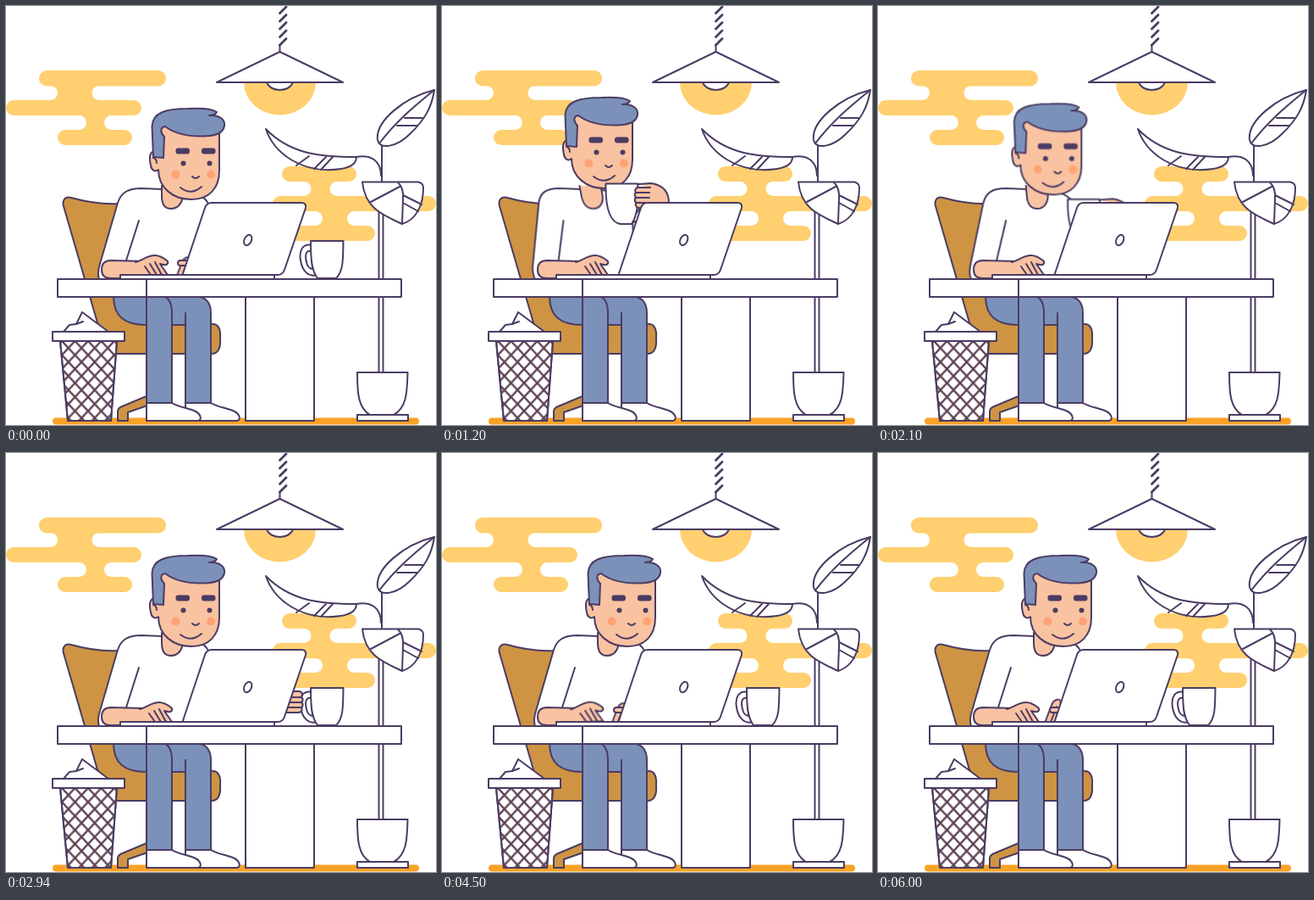
Animation of 508 by 494 pixels, one loop 6.06 s. Source, as an HTML page without scripts:

```html
<!DOCTYPE html>
<html lang="en">
<head>
<meta charset="utf-8">
<title>Coffee break at the desk</title>
<style>
  html, body { margin: 0; width: 100%; height: 100%; overflow: hidden; background: #fff; }
  svg { display: block; width: 100%; height: 100%; }
  :root { --loop: 6060ms; --beat: 178.235ms; }

  .ink { stroke: #4b3c63; stroke-width: 2; stroke-linecap: round; stroke-linejoin: round; fill: none; }
  .white { fill: #fff; }
  .skin { fill: #f9c2a1; }
  .blue { fill: #7b91ba; }
  .wood { fill: #ce9443; }
  .sun { fill: #ffcf70; }
  .dark { fill: #4b3c63; stroke: none; }
  .blush { fill: #ffa374; stroke: none; }

  .torso, .head, .sip, .mug, .grip, .keys, .still, .busy, .eyes {
    animation: var(--loop) ease-in-out infinite;
  }
  .torso { animation-name: torso; transform-origin: 0 322px; }
  .head { animation-name: head; transform-origin: 200px 225px; }
  .sip { animation-name: sip; transform-origin: 238px 232px; }
  .mug { animation-name: mug; }
  .grip { animation-name: grip; }
  .keys { animation-name: keys; }
  .still { animation-name: still; }
  .busy { animation-name: busy; animation-timing-function: step-end; }
  .eyes { animation-name: blink; transform-origin: 225px 185px; }
  .tapL, .tapR { animation: tapL var(--beat) -70ms ease-in-out infinite alternate; }
  .tapL { transform-origin: 160px 306px; }
  .tapR { animation-name: tapR; }

  @keyframes torso {
    0%, 11.2% { transform: skewX(0deg); }
    19.8%, 29.7% { transform: skewX(11.1deg); }
    38.9%, 100% { transform: skewX(0deg); }
  }
  @keyframes head {
    0%, 11.2% { transform: translate(0, 0) rotate(0deg); }
    19.8% { transform: translate(-27px, -13px) rotate(0deg); }
    23.5%, 27% { transform: translate(-28px, -14px) rotate(-4deg); }
    29.7% { transform: translate(-27px, -13px) rotate(0deg); }
    38.9%, 100% { transform: translate(0, 0) rotate(0deg); }
  }
  @keyframes sip {
    0%, 11.4% { transform: translate(70px, 42px) rotate(0deg); }
    19.8% { transform: translate(0, 0) rotate(0deg); }
    23.5%, 27% { transform: translate(-4px, -4px) rotate(-10deg); }
    30.4% { transform: translate(0, 0) rotate(0deg); }
    39.6%, 100% { transform: translate(70px, 42px) rotate(0deg); }
  }
  @keyframes mug {
    0%, 5.4% { transform: translate(0, 0); }
    8% { transform: translate(-14px, -19px); }
    12.2%, 39.4% { transform: translate(-72px, -22px); }
    43% { transform: translate(-14px, -16px); }
    45.6%, 100% { transform: translate(0, 0); }
  }
  @keyframes grip {
    0%, 1.8% { transform: translate(-34px, 0); }
    5%, 48.8% { transform: translate(0, 0); }
    51.8%, 100% { transform: translate(-34px, 0); }
  }
  @keyframes keys {
    0% { transform: translate(0, 0); }
    3%, 51.8% { transform: translate(30px, 0); }
    54.8%, 100% { transform: translate(0, 0); }
  }
  @keyframes still {
    0%, 12% { transform: translate(-5px, 0); visibility: visible; }
    15%, 54.4% { transform: translate(0, 0); visibility: visible; }
    54.5%, 100% { transform: translate(-5px, 0); visibility: hidden; }
  }
  @keyframes busy {
    0% { visibility: hidden; }
    54.45%, 100% { visibility: visible; }
  }
  @keyframes blink {
    0%, 56.5%, 59.5%, 70%, 73%, 79.5%, 82.5%, 100% { transform: scaleY(1); }
    58%, 71.5%, 81% { transform: scaleY(.1); }
  }
  @keyframes tapL {
    from { transform: translate(-6px, 0) rotate(0deg); }
    to { transform: translate(-5px, 1px) rotate(-6deg); }
  }
  @keyframes tapR {
    from { transform: translate(0, 0); }
    to { transform: translate(8px, 17px); }
  }
</style>
</head>
<body>
<svg viewBox="0 0 508 494" preserveAspectRatio="none">
  <defs>
    <pattern id="mesh" width="15.500" height="16.500" patternUnits="userSpaceOnUse" x="66" y="395">
      <path d="M-1.550-1.650L17.050 18.150M17.050-1.650L-1.550 18.150" stroke="#5b4052" stroke-width="2.400"/>
    </pattern>
    <g id="hand" class="ink skin">
      <path d="M158 302C166 300 172 294 181 294C187 294 191 297 195 300C198 303 195 306 191 305L187 304L196 317H174L160 318"/>
      <path d="M181 302L189 317M175 304L183 317M169 307L176 317" fill="none"/>
    </g>
  </defs>

  <rect x="55" y="485.500" width="433" height="8" rx="4" fill="#f9a226"/>

  <!-- clouds -->
  <g class="sun">
    <rect x="39" y="76" width="150" height="18.500" rx="9"/>
    <rect x="0" y="111" width="160" height="18" rx="9"/>
    <rect x="61" y="146" width="88" height="18" rx="9"/>
    <path d="M52.500 94a8.500 8.500 0 0 1 0 17H110a8.500 8.500 0 0 1 0-17z"/>
    <path d="M86.500 129a8.500 8.500 0 0 1 0 17H124.500a8.500 8.500 0 0 1 0-17z"/>
    <rect x="326" y="189" width="88" height="18" rx="9"/>
    <rect x="315" y="224" width="193" height="18" rx="9"/>
    <rect x="312" y="259" width="124" height="18" rx="9"/>
    <path d="M352 207a8.500 8.500 0 0 1 0 17H391a8.500 8.500 0 0 1 0-17z"/>
    <path d="M365.500 242a8.500 8.500 0 0 1 0 17H411.500a8.500 8.500 0 0 1 0-17z"/>
  </g>

  <!-- lamp -->
  <path class="sun" d="M281 90A42.500 38.500 0 0 0 366 90z"/>
  <g class="ink">
    <path class="white" d="M308 90C312 102 335 102 339 90"/>
    <path class="white" d="M249 90L323.500 54L398 90z"/>
    <path d="M323.500 54V46"/>
    <path d="M323.500 46L331 38.500M323.500 36.500L331 29M323.500 27L331 19.500M323.500 18L331 10.500M323.500 8.500L331 1" stroke-width="2.800"/>
  </g>

  <!-- chair -->
  <g class="ink wood">
    <path d="M166 460L135 473Q132 475 132 478V489H144V479L170 470z"/>
    <path d="M68 236C66 229 70 224 77 226C98 232 115 234 134 233L170 375H243C250 374 254 380 253 392C254 404 250 410 243 410H133C123 410 117 404 114 394z"/>
  </g>

  <!-- legs -->
  <g class="ink">
    <path class="blue" d="M190 342H222C236 342 242 350 242 362V468H212V376H190z"/>
    <path d="M212 376V362"/>
    <path class="blue" d="M127 342C127 366 140 376 166 376V468H196V362C196 350 192 344 186 342z"/>
    <path d="M166 376V350"/>
    <path id="shoe" class="white" d="M212 468H242C250 473 262 474 270 478C276 481 278 488 273 489H212z"/>
    <use href="#shoe" x="-46"/>
  </g>

  <!-- body -->
  <g class="torso ink">
    <path class="white" d="M110 322C108 316 109 310 111 304L132 232C136 220 144 215 160 215L209 217C225 218 238 226 241 238L228 322z"/>
    <path d="M157 253L142 300"/>
    <path class="skin" d="M184 212V224C184 234 188 239 195 239C203 239 209 232 209 222V212"/>
  </g>

  <!-- typing hand beside the screen -->
  <g class="keys ink skin">
    <g class="tapR">
      <path d="M197 318L205 297C207 291 212 289 216 292L213 318z"/>
      <path d="M204 317L211 299" fill="none"/>
    </g>
    <path d="M222 300H206C202 300 202 306 206 306H222z"/>
  </g>

  <!-- mug on the desk -->
  <g class="mug ink">
    <path class="white" fill-rule="evenodd" d="M362 282C350 279 346 289 348 300C350 312 357 320 367 317zM361 289C354 287 353 294 355 302C356 307 359 310 362 310z"/>
    <path class="white" d="M360 277H398.500C398 298 399 312 390 321H368C361 312 360 298 360 277z"/>
    <g class="grip skin">
      <path d="M312 284L338 281H346C351 281 351 287 348 288C352 289 351 294 348 294C352 295 351 300 348 300C351 301 350 306 345 306H312z"/>
      <path d="M334 288H348M334 294H348M334 300H348" fill="none"/>
    </g>
  </g>

  <!-- head -->
  <g class="head ink">
    <path class="skin" d="M178 140V171C169 170 169 179 171 188C172 194 176 196 180 193C180 214 197 228 219 228C240 228 252 215 252 194V140z"/>
    <path d="M174 179Q178 180 178 185"/>
    <path class="blue" d="M174 178L172.500 142C173 126 188 121 215 121C232 120 243 121 249 125Q247 129 240 129C252 128 259 134 258 141C257 148 250 152 241 153C219 155 200 151 188 142C182 143 182 149 187 154L186 179z"/>
    <g class="dark">
      <rect x="200.500" y="167.500" width="16.500" height="7" rx="3"/>
      <rect x="231" y="167.500" width="16.500" height="7" rx="3"/>
      <g class="eyes"><circle cx="209.500" cy="185.500" r="3"/><circle cx="240.500" cy="185.500" r="3"/></g>
    </g>
    <g class="blush"><circle cx="200.500" cy="198.500" r="5"/><circle cx="242" cy="198.500" r="5"/></g>
    <path d="M220 201Q224 205 228 201M206 214Q219 224 231 213"/>
  </g>

  <!-- raised mug and forearm -->
  <g class="sip ink">
    <path class="white" d="M230 219H243C244 240 240 250 227 255L225 247C233 244 235 236 235 227z"/>
    <path class="white" d="M193.500 209.500H231C233 228 231 247 224 257H211C197 255 193 236 193.500 209.500z"/>
    <path class="skin" d="M232 210L247 209C260 211 268 218 268 232L252 262H246L242 238H232C228 237 228 232 230 232C227 231 227 226 230 226C227 225 227 220 230 220C227 219 228 214 232 214H246"/>
    <path d="M230 220H245M230 226H245M230 232H244"/>
  </g>

  <!-- laptop -->
  <g class="ink white">
    <path d="M208.500 317L235 238Q237 232 243 232H349Q355 232 354 238L329 311Q327 317 321 317z"/>
    <ellipse cx="285.700" cy="276" rx="4.200" ry="6.500" transform="rotate(26 285.700 276)"/>
  </g>

  <!-- resting forearm -->
  <path class="ink skin" d="M164 301L124 300C116 300 113 304 113 311C113 318 117 321 124 321H164"/>
  <g class="still"><use href="#hand"/></g>
  <g class="busy"><g class="tapL"><use href="#hand"/></g></g>

  <!-- plant -->
  <g class="ink white">
    <path d="M440.500 432V230H445.500V432"/>
    <path d="M444 207V165M414 178C432 175 443 183 443 200" fill="none"/>
    <path d="M506 99C470 108 436 136 439 158C442 170 462 166 477 151C494 135 503 120 506 99z"/>
    <path d="M506 99C480 120 460 137 441 162M471 132H492M462 141H486"/>
    <path d="M307 145C316 172 348 199 396 192C408 190 414 185 414 178C372 178 336 175 307 145z"/>
    <path d="M358 177L343 188M378 178L364 192M386 178L372 193"/>
    <path d="M421 207.500H487Q493 209 493 214C493 236 484 252 468 257C444 246 424 238 421 207.500z"/>
    <path d="M463 208Q470 214 469 228L468 256M431 231L465 213M469 223L491 234M469 232L487 242" fill="none"/>
    <path d="M415 432H474.500C474 456 473 474 458 482H430C416 474 415 456 415 432z"/>
    <rect x="415" y="482" width="60" height="7"/>
  </g>

  <!-- desk -->
  <g class="ink white">
    <rect x="135" y="317" width="182" height="5"/>
    <rect x="283" y="343" width="81" height="146"/>
    <rect x="61" y="322" width="406" height="21"/>
    <path d="M166 322V350"/>
  </g>

  <!-- bin -->
  <g class="ink white">
    <path d="M68 384L75 376L83 375L90 361L121 384z"/>
    <path d="M83 375L91 372"/>
    <path d="M64 395H131L124 489H73z"/>
    <path d="M64 395H131L124 489H73z" style="fill:url(#mesh)"/>
    <rect x="55" y="384" width="85" height="11"/>
  </g>
</svg>
</body>
</html>
```
